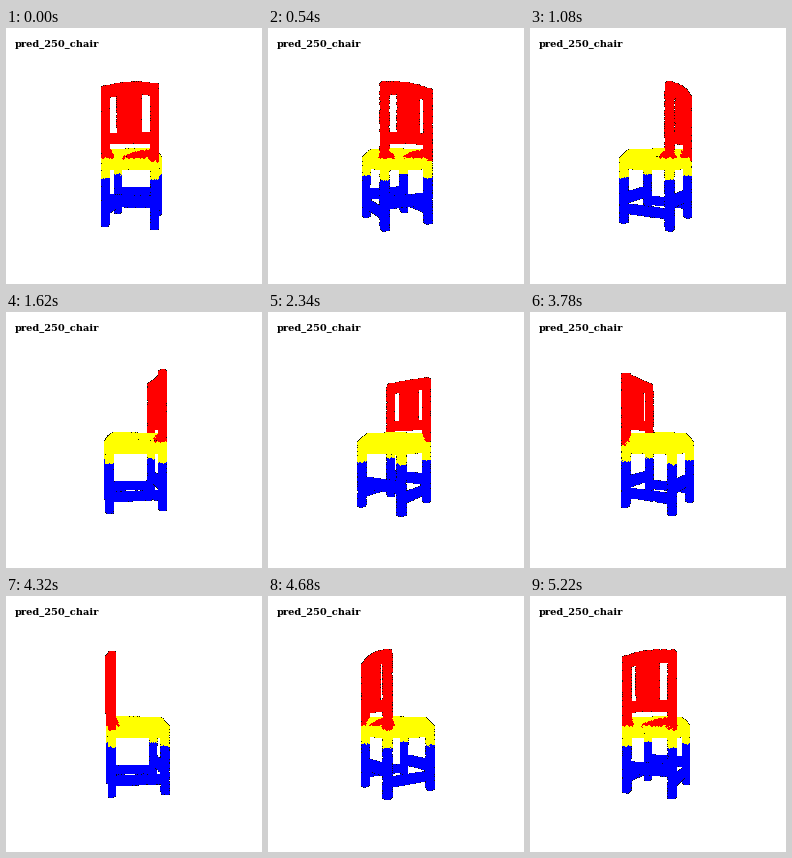
Animation, 256 px wide and 256 px high, one loop 5.4 s. Source, as a matplotlib script:

```python
import numpy as np
import matplotlib.pyplot as plt
from matplotlib.animation import FuncAnimation

SIZE, FRAMES, INTERVAL = 256, 30, 180
START, CAMERA, DENSITY = -9.5, 218.0, 1.1
RED, YELLOW, BLUE, DARK = (255, 0, 0), (255, 255, 0), (0, 0, 255), (16, 16, 8)

SIDE, BACK, FRONT, HALF = 22.4, 22.9, -25.3, 2.4   # leg centres, half leg width
TOP, LEG_TINT = 62.5, -20.5

rng = np.random.default_rng(250)


def box(u0, u1, v0, v1, h0, h1):
    """Random points on the surface of a box."""
    lo, hi = np.array([u0, v0, h0]), np.array([u1, v1, h1])
    faces = []
    for axis in range(3):
        area = np.prod(np.delete(hi - lo, axis))
        for end in (lo, hi):
            p = rng.uniform(lo, hi, (int(area * DENSITY) + 1, 3))
            p[:, axis] = end[axis]
            faces.append(p)
    return np.vstack(faces)


def by_height(p, upper):
    tint = np.empty((len(p), 3), np.uint8)
    tint[:] = YELLOW
    tint[p[:, 2] > -3.4 - 0.06 * p[:, 0]] = upper
    tint[p[:, 2] < LEG_TINT] = BLUE
    return p, tint


def leg(u, v, top):
    return box(u - HALF, u + HALF, v - HALF, v + HALF, -63, top)


def panel(u0, u1, h0, h1):
    """Part of the back rest, bowed outwards and slightly arched."""
    p = box(u0, u1, BACK - 1.5, BACK + 1.5, h0, h1)
    bow = 1 - (p[:, 0] / SIDE) ** 2
    p[:, 1] += 3 * bow
    p[:, 2] += 1.5 * bow * (p[:, 2] > 50)
    return p


def cushion():
    u0, v0, v1 = 24.6, FRONT - 2.3, BACK + 2.3
    n = int(2 * u0 * (v1 - v0) * DENSITY * 2)
    u, v = rng.uniform(-u0, u0, n), rng.uniform(v0, v1, n)
    rise = lambda d: np.minimum(1, d / 6) ** 0.6
    du, dv = u0 - np.abs(u), np.minimum(v - v0, v1 - v)
    h = -2 + 7.5 * rise(du) * rise(dv)
    tint = np.empty((n, 3), np.uint8)
    tint[:] = YELLOW
    rear = v1 - v
    tint[(rear < 0.25 * (u + 6)) | (rear < 1.1 * (-u - 14))] = RED
    return np.column_stack([u, v, h]), tint


def build():
    parts = [cushion()]
    for s in (-SIDE, SIDE):
        parts.append(by_height(leg(s, BACK, TOP), RED))
        parts.append(by_height(leg(s, FRONT, -2), YELLOW))
        # side apron and low side stretcher
        parts.append(by_height(box(s - 2, s + 2, FRONT, BACK, -11.2, -2), YELLOW))
        parts.append(by_height(box(s - 1.5, s + 1.5, FRONT, BACK, -53.5, -47), BLUE))
    for v in (BACK, FRONT):
        parts.append(by_height(box(-SIDE, SIDE, v - 2, v + 2, -11.2, -2), YELLOW))
        parts.append(by_height(box(-SIDE, SIDE, v - 1.5, v + 1.5, -44.7, -36.3), BLUE))
    rest = [(-SIDE, SIDE, 54, TOP), (-SIDE, SIDE, 12, 19.5),
            (-10, -5.2, 19, 54), (-3.8, 3.8, 19, 54), (5.2, 10, 19, 54)]
    parts += [by_height(panel(*r), RED) for r in rest]
    points, tints = zip(*parts)
    return np.vstack(points), np.vstack(tints)


points, tints = build()
STAMP = [(dx, dy) for dx in (-1, 0, 1) for dy in (-1, 0, 1)]


def render(turn):
    """Splat the cloud as tiny balls, far to near; dark rims sit well behind."""
    c, s = np.cos(turn), np.sin(turn)
    u, v, h = points.T
    x, z = u * c + v * s, v * c - u * s
    k = CAMERA / (CAMERA - z)
    px = np.floor(SIZE / 2 + x * k).astype(int)
    py = np.floor(SIZE / 2 - h * k).astype(int)
    cells, depth, shade = [], [], []
    for dx, dy in STAMP:
        rim = bool(dx and dy)
        cells.append((py + dy) * SIZE + px + dx)
        depth.append(z - 15 * rim)
        shade.append(np.full_like(tints, DARK) if rim else tints)
    order = np.argsort(np.concatenate(depth), kind="stable")
    image = np.full((SIZE * SIZE, 3), 255, np.uint8)
    image[np.concatenate(cells)[order]] = np.vstack(shade)[order]
    return image.reshape(SIZE, SIZE, 3)


fig = plt.figure(figsize=(2.56, 2.56), dpi=100, facecolor="white")
ax = fig.add_axes([0, 0, 1, 1])
ax.axis("off")
view = ax.imshow(render(np.radians(START)), interpolation="nearest",
                 extent=(0, SIZE, SIZE, 0))
ax.text(9, 19, "pred_250_chair", family="DejaVu Serif", weight="bold",
        size=7.1, color="black", va="baseline")


def update(i):
    view.set_data(render(np.radians(START + i * 360 / FRAMES)))
    return [view]


anim = FuncAnimation(fig, update, frames=FRAMES, interval=INTERVAL,
                     repeat=True, repeat_delay=0)
plt.show()
```
